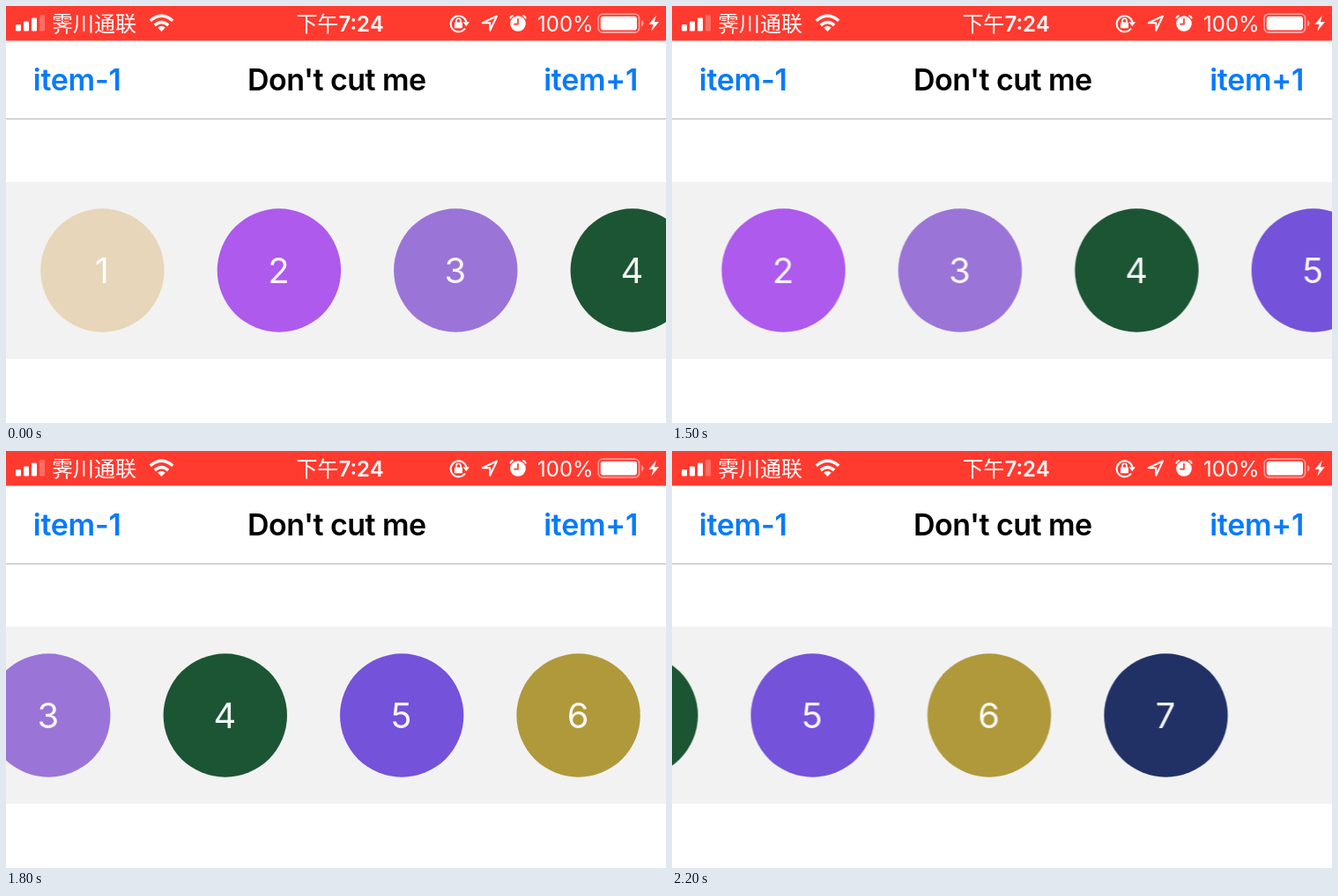
These frames come from a looping animation (749 by 474 pixels, 4100 ms). An HTML page:

```html
<!DOCTYPE html>
<html lang="zh">
<head>
<meta charset="utf-8">
<title>Horizontal list</title>
<style>
  html, body { margin: 0; width: 100%; height: 100%; overflow: hidden; background: #fff; }
  svg { display: block; width: 100%; height: 100%; }
  text { font-family: Inter, "Noto Sans CJK SC", "Noto Sans CJK", sans-serif; }
  .status text { font-size: 24px; fill: #fff; }
  .line { fill: none; stroke: #fff; stroke-width: 2; stroke-linecap: round; stroke-linejoin: round; }
  .nav text { font-size: 34px; font-weight: 600; letter-spacing: -.55px; }
  .nav .button { fill: #087bfa; letter-spacing: -.3px; }
  .items text { font-size: 40px; fill: #fff; fill-opacity: .95; text-anchor: middle; }
  .items circle { r: 70.2px; cy: 300.5px; }
  .items { animation: scroll 4100ms step-end infinite; }

  /* a slow drag, then a fling; the view redraws every 100 ms */
  @keyframes scroll {
    0% { transform: translateX(0); }
    26.82% { transform: translateX(-28.2px); }
    29.26% { transform: translateX(-63px); }
    31.70% { transform: translateX(-100.3px); }
    34.14% { transform: translateX(-140px); }
    36.58% { transform: translateX(-183.4px); }
    39.02% { transform: translateX(-234px); }
    41.46% { transform: translateX(-298.8px); }
    43.90% { transform: translateX(-462px); }
    46.34% { transform: translateX(-622.6px); }
    48.78% { transform: translateX(-703px); }
    51.21% { transform: translateX(-740px); }
    53.65%, 100% { transform: translateX(-751.6px); }
  }
</style>
</head>
<body>
<svg viewBox="0 0 749 474" preserveAspectRatio="none">
  <rect y="200" width="749" height="201" fill="#f2f2f2"/>
  <g class="items">
    <g transform="translate(109.4)"><circle fill="#e7d6b9"/><text x="-.5" y="315">1</text></g>
    <g transform="translate(309.9)"><circle fill="#ae5aed"/><text x="-.5" y="315">2</text></g>
    <g transform="translate(510.3)"><circle fill="#9a75d7"/><text x="-.5" y="315">3</text></g>
    <g transform="translate(710.8)"><circle fill="#1c5533"/><text x="-.5" y="315">4</text></g>
    <g transform="translate(911.2)"><circle fill="#7452da"/><text x="-.5" y="315">5</text></g>
    <g transform="translate(1111.6)"><circle fill="#b0993b"/><text x="-.5" y="315">6</text></g>
    <g transform="translate(1312.1)"><circle fill="#213166"/><text x="-.5" y="315">7</text></g>
  </g>

  <g class="nav">
    <rect y="127.7" width="749" height="1.1" fill="#b4b4b4"/>
    <text class="button" x="30.8" y="96">item-1</text>
    <text x="375.3" y="96" text-anchor="middle">Don't cut me</text>
    <text class="button" x="717" y="96" text-anchor="end">item+1</text>
  </g>

  <g class="status" fill="#fff">
    <rect width="749" height="39.5" fill="#ff3b30"/>
    <!-- signal -->
    <rect x="11" y="21" width="6" height="7.5" rx="1.2"/>
    <rect x="20" y="17.5" width="6" height="11" rx="1.2"/>
    <rect x="29" y="13.5" width="6" height="15" rx="1.2"/>
    <rect x="38" y="10" width="6" height="18.5" rx="1.2" opacity=".25"/>
    <text x="52" y="28.5" font-weight="300">霁川通联</text>
    <!-- wifi -->
    <path d="M176.5 29L172.2 24.6Q176.5 21 180.8 24.6Z"/>
    <path class="line" style="stroke-width:3.4;stroke-linecap:butt" d="M168.8 21.9Q176.5 15.2 184.2 21.9M163.8 16.8Q176.5 5.8 189.2 16.8"/>

    <text x="379" y="28.5" text-anchor="middle" font-weight="600"><tspan font-weight="500">下午</tspan>7:24</text>

    <!-- rotation lock -->
    <path class="line" d="M520.5 26.2A9 9 0 1 1 522.4 18"/>
    <path d="M518.5 18.2H526L522.3 23Z"/>
    <rect x="509" y="18.6" width="9" height="6.6" rx="1"/>
    <path class="line" style="stroke-width:1.6" d="M511 19V16.8A2.5 2.5 0 0 1 516 16.8V19"/>
    <!-- location -->
    <path class="line" d="M557 11.5L540.8 19.2H549.3V27.8Z"/>
    <!-- alarm -->
    <circle cx="581" cy="20" r="8.8"/>
    <path class="line" d="M572.4 13.6Q573 11.6 575 11M589.6 13.6Q589 11.6 587 11"/>
    <path class="line" style="stroke:#ff3b30;stroke-width:1.7" d="M581 14.8V20.6H577"/>
    <text x="603" y="28.5" font-weight="400">100%</text>
    <!-- battery -->
    <rect x="672.2" y="9.2" width="46.4" height="20.8" rx="5" fill="none" stroke="#fff" stroke-opacity=".5" stroke-width="1.8"/>
    <rect x="674.8" y="11.8" width="41.2" height="15.6" rx="2.8"/>
    <path d="M721 16Q723.6 17 723.6 19.6T721 23.2Z" opacity=".5"/>
    <path d="M738 10.5L729.5 20.8H734.6L732.4 28.5L741 18H735.8Z"/>
  </g>
</svg>
</body>
</html>
```
